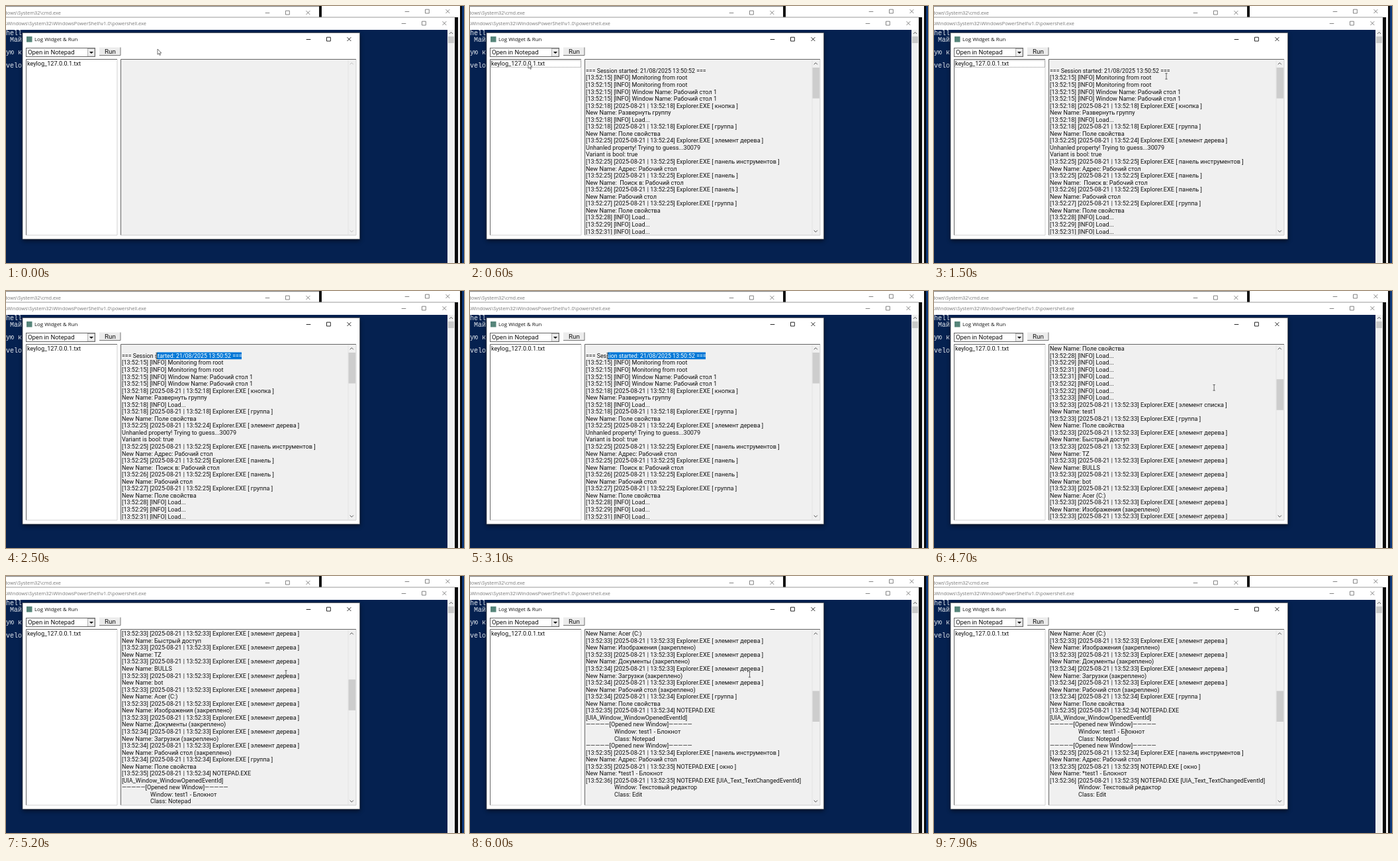
Recreate the animation shown at these times as an HTML page. Size 692 by 388 pixels, loop 8 s.

```html
<!DOCTYPE html>
<html lang="en">
<head>
<meta charset="utf-8">
<title>Log Widget</title>
<style>
  html, body { margin: 0; width: 100%; height: 100%; overflow: hidden; background: #052150; }
  svg { display: block; width: 100vw; height: 100vh; }
  text { white-space: pre; }
  .ui { font: 9.1px Roboto, sans-serif; fill: #111; }
  .title { font: 7.4px "Open Sans", sans-serif; fill: #777; }
  .console { font: 10px "Liberation Mono", monospace; fill: #e4e8ee; }
  .session { font-size: 8.8px; }
  .line { fill: none; stroke-width: .9; }
</style>
</head>
<body>
<svg viewBox="0 0 692 388" preserveAspectRatio="none">
  <defs>
    <filter id="blur" x="-10%" y="-10%" width="120%" height="120%"><feGaussianBlur stdDeviation="3"/></filter>
    <clipPath id="pane"><rect x="174" y="82" width="343" height="263"/></clipPath>
    <clipPath id="picked"><rect id="pickedArea" y="92.5" height="10.6"/></clipPath>
  </defs>

  <!-- windows behind -->
  <rect width="692" height="388" fill="#052150"/>
  <rect width="692" height="36" fill="#fff"/>
  <rect width="473" height="1.2" fill="#888"/>
  <rect x="473" width="4" height="17" fill="#111"/>
  <rect y="16.5" width="678" height="1" fill="#999"/>
  <text class="title" x="83" y="13" text-anchor="end">C:\Windows\System32\cmd.exe</text>
  <text class="title" x="212" y="29.3" text-anchor="end">C:\Windows\System32\WindowsPowerShell\v1.0\powershell.exe</text>
  <g class="console">
    <text x="0" y="43.5">hell</text>
    <text x="6" y="53.5">Май</text>
    <text x="0" y="73">ую к</text>
    <text x="0" y="92.5">velo</text>
  </g>
  <rect x="667" y="36" width="11" height="352" fill="#f0f0f0"/>
  <rect x="668" y="46" width="9" height="10" fill="#c9c9c9"/>
  <path class="line" d="M670 42l2.5-2.5 2.5 2.5" stroke="#444"/>
  <rect x="678" y="17" width="5" height="371" fill="#0a0a0c"/>
  <rect x="683" y="17" width="3" height="371" fill="#f4f4f4"/>
  <rect x="686" width="3" height="388" fill="#0a0a0c"/>
  <rect x="689" width="3" height="388" fill="#0b3678"/>

  <!-- log window -->
  <rect x="25" y="43" width="510" height="312" fill="#000" opacity=".5" filter="url(#blur)"/>
  <rect x="25" y="40.5" width="509.5" height="311.5" fill="#fff" stroke="#555" stroke-width=".7"/>
  <rect x="31" y="46" width="8.5" height="8.5" fill="#56857a"/>
  <text class="title" x="43" y="53.2" style="font-size:7.9px;fill:#111">Log Widget &amp; Run</text>
  <g id="captions"></g>

  <rect class="line" x="30.5" y="63.5" width="104" height="13" stroke="#555"/>
  <text class="ui" x="33" y="73.4" style="font-size:9.5px">Open in Notepad</text>
  <rect x="123.5" y="64.5" width="10.5" height="11.5" fill="#ececec" stroke="#888" stroke-width=".6"/>
  <path d="M126 69h6l-3 3z" fill="#000"/>
  <rect x="141" y="62.5" width="32" height="12" fill="#ececec"/>
  <path class="line" d="M141 74.5h32v-12" stroke="#666"/>
  <text class="ui" x="149" y="71.6" style="font-size:9.8px">Run</text>

  <rect x="173" y="80" width="356" height="266.5" fill="#f0f0f0"/>
  <path class="line" d="M30.5 346v-265.5h137.5M173.5 346v-265.5h355.5" stroke="#555"/>
  <path class="line" d="M30.5 346h137.5v-265M173.5 346h355.5v-265" stroke="#ccc"/>
  <text class="ui" x="32" y="90.2">keylog_127.0.0.1.txt</text>
  <rect id="focus" class="line" x="31.8" y="82" width="135.5" height="10.4" stroke="#777" stroke-width=".7" stroke-dasharray="1 1"/>

  <g clip-path="url(#pane)">
    <g id="log" class="ui">
      <g id="lines"></g>
      <rect id="mark" y="92.5" height="10.6" fill="#0078d7"/>
      <g id="picks" clip-path="url(#picked)" fill="#fff"></g>
    </g>
  </g>
  <path class="line" d="M517 82v263" stroke="#e2e2e2"/>
  <rect id="thumb" x="517.5" width="10.5" height="46.5" fill="#cdcdcd"/>
  <path id="arrows" class="line" d="M519.7 88.3l2.6-2.6 2.6 2.6M519.7 338.7l2.6 2.6 2.6-2.6"/>

  <path id="arrow" d="M0 0v8.2l1.9-1.7 1.3 2.9 1.3-.6-1.3-2.8h2.6z" fill="#fff" stroke="#333" stroke-width=".7"/>
  <path id="beam" class="line" d="M-1.7-4.3h3.4M0-4.3v8.6M-1.7 4.3h3.4" stroke="#444" style="stroke-width:.8"/>
</svg>
<script>
const LOOP = 8000, STEP = 100, PITCH = 10.55;
const $ = id => document.getElementById(id);

function add(parent, tag, attrs, text = '') {
  const node = document.createElementNS('http://www.w3.org/2000/svg', tag);
  for (const key in attrs) node.setAttribute(key, attrs[key]);
  node.textContent = text;
  return parent.appendChild(node);
}

// Minimise, maximise and close signs: x of the first one, y, colour
for (const [x, y, color] of [[395, 10, '#777'], [606, 8, '#777'], [601, 26, '#777'], [457, 50, '#111']])
  add($('captions'), 'path', {
    class: 'line', stroke: color,
    d: `M${x - 3.3} ${y + .5}h6.6M${x + 27.5} ${y - 2.8}h5.8v5.8h-5.8z` +
       `M${x + 58.5} ${y - 2.8}l5.8 5.8m0-5.8l-5.8 5.8`
  });

// Log contents; s and e are the seconds of the written and the seen time
const stamp = s => `[13:52:${s}] `;
const info = (s, what = 'Load...') => `${stamp(s)}[INFO] ${what}`;
const event = (s, e, what, app = 'Explorer') => `${stamp(s)}[2025-08-21 | 13:52:${e}] ${app}.EXE ${what}`;
const named = (s, e, kind, name, app) => [event(s, e, `[ ${kind} ]`, app), 'New Name: ' + name];
const tree = (s, name) => named(s, 33, 'элемент дерева', name);
const desk = 'Рабочий стол', field = 'Поле свойства', pinned = ' (закреплено)';
const opened = '—————[Opened new Window]—————';
const root = info(15, 'Monitoring from root'), top1 = info(15, `Window Name: ${desk} 1`);

const log = [
  '', '=== Session started: 21/08/2025 13:50:52 ===',
  root, root, top1, top1,
  ...named(18, 18, 'кнопка', 'Развернуть группу'),
  info(18),
  ...named(18, 18, 'группа', field),
  event(25, 24, '[ элемент дерева ]'),
  'Unhanled property! Trying to guess...30079', 'Variant is bool: true',
  ...named(25, 25, 'панель инструментов', 'Адрес: ' + desk),
  ...named(25, 25, 'панель', ' Поиск в: ' + desk),
  ...named(26, 25, 'панель', desk),
  ...named(27, 25, 'группа', field),
  ...[28, 29, 31, 31, 32, 32, 33].map(s => info(s)),
  ...named(33, 33, 'элемент списка', 'test1'),
  ...named(33, 33, 'группа', field),
  ...['Быстрый доступ', 'TZ', 'BULLS', 'bot', 'Acer (C:)', 'Изображения' + pinned, 'Документы' + pinned]
    .flatMap(name => tree(33, name)),
  ...tree(34, 'Загрузки' + pinned),
  ...tree(34, desk + pinned),
  ...named(34, 34, 'группа', field),
  event(35, 34, '', 'NOTEPAD'), '[UIA_Window_WindowOpenedEventId]',
  opened, '\tWindow: test1 - Блокнот', '\tClass: Notepad', opened,
  ...named(35, 34, 'панель инструментов', 'Адрес: ' + desk),
  ...named(35, 35, 'окно', '*test1 - Блокнот', 'NOTEPAD'),
  event(36, 35, '[UIA_Text_TextChangedEventId]', 'NOTEPAD'),
  '\tWindow: Текстовый редактор', '\tClass: Edit'
];
const lineAttrs = i => ({
  x: log[i][0] === '\t' ? 218 : 175, y: 90.3 + i * PITCH, class: i === 1 ? 'session' : ''
});
log.forEach((line, i) => add($('lines'), 'text', lineAttrs(i), line.trim()));
const picked = add($('picks'), 'text', lineAttrs(1), log[1]);
const lineEnd = 175 + Math.min(picked.getComputedTextLength(), 181);

// Pointer stops: time, x, y
const path = [
  [0, 229, 65], [500, 88, 86], [900, 88, 86], [1500, 351, 106], [1800, 356, 99],
  [2600, 222, 98], [2700, 222, 98], [3100, 208, 98], [3600, 424, 143], [4000, 423.5, 144],
  [5200, 423, 147], [5400, 422.5, 148.5], [7100, 422.5, 148.5], [7600, 305, 239], [7900, 290, 236]
];
// Scroll steps: time, first visible line
const scroll = [
  [0, 0], [3700, 3], [3900, 6], [4000, 9], [4100, 12], [4500, 15], [4600, 18], [4700, 21],
  [4800, 27], [4900, 30], [5200, 33], [5300, 39], [5400, 42]
];

function pointer(t) {
  const i = path.findIndex(stop => stop[0] > t);
  if (i < 0) return path[path.length - 1].slice(1);
  const [t0, x0, y0] = path[i - 1], [t1, x1, y1] = path[i];
  const p = (t - t0) / (t1 - t0), k = p * p * (3 - 2 * p);
  return [x0 + (x1 - x0) * k, y0 + (y1 - y0) * k];
}

const show = (id, on) => $(id).setAttribute('visibility', on ? 'visible' : 'hidden');

function draw(t) {
  const loaded = t >= 500, selecting = t >= 1900;
  const first = scroll.filter(step => step[0] <= t).pop()[1];
  const [x, y] = pointer(t), inPane = x > 174 && y > 81;

  show('log', loaded);
  show('thumb', loaded);
  show('focus', loaded && !selecting);
  $('arrows').setAttribute('stroke', loaded ? '#444' : '#bbb');
  $('log').setAttribute('transform', `translate(0 ${-first * PITCH})`);
  $('thumb').setAttribute('y', 93 + first * 1.917);

  const left = selecting ? Math.min(pointer(Math.min(t, 3100))[0], lineEnd) : lineEnd;
  for (const id of ['mark', 'pickedArea']) {
    $(id).setAttribute('x', left);
    $(id).setAttribute('width', lineEnd - left);
  }
  show('arrow', !inPane);
  show('beam', inPane);
  $(inPane ? 'beam' : 'arrow').setAttribute('transform', `translate(${x} ${y})`);
}

const start = performance.now();
function tick() {
  const t = (performance.now() - start) % LOOP;
  draw(Math.floor(t / STEP) * STEP);
  requestAnimationFrame(tick);
}
tick();
</script>
</body>
</html>
```
